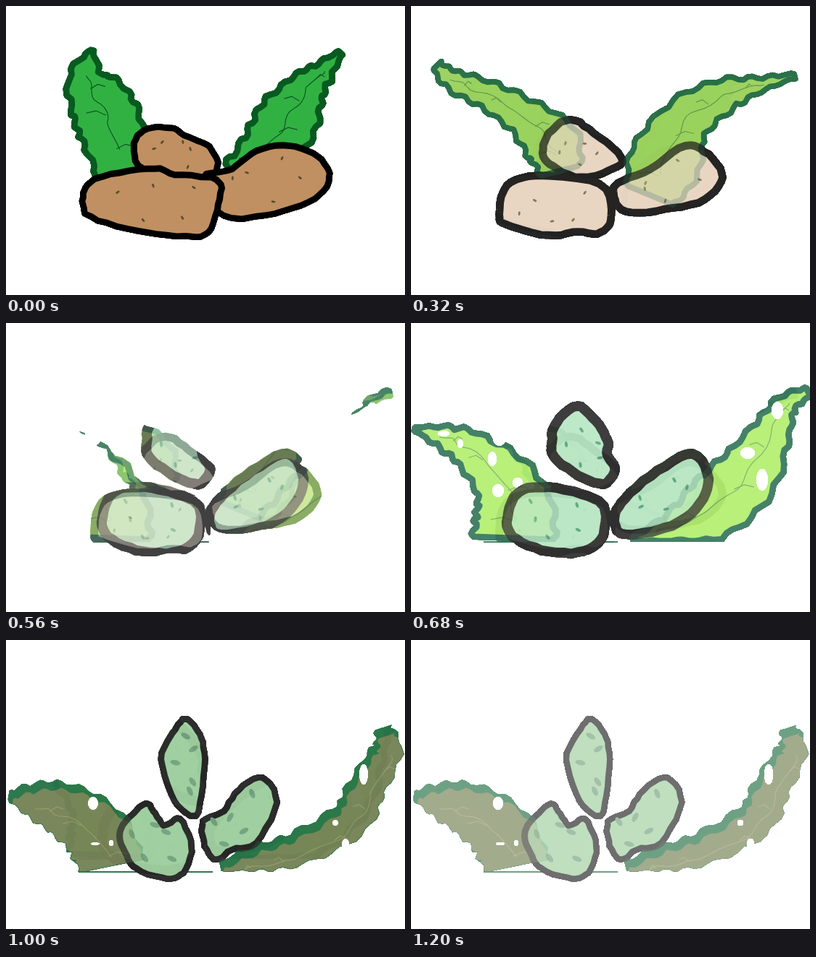
These frames come from a looping animation (550 by 400 pixels, 1.24 s). An HTML page with a canvas:

```html
<!DOCTYPE html>
<html lang="en">
<head>
<meta charset="utf-8">
<title>Potatoes and leaves</title>
<style>
html, body { margin: 0; width: 100%; height: 100%; overflow: hidden; background: #fff; }
canvas { display: block; width: 550px; height: 400px; }
</style>
</head>
<body>
<canvas id="stage" width="550" height="400"></canvas>
<script>
const W = 550, H = 400, STEP = 40, STEPS = 31, CUT = 140;

let seed = 7;
const rnd = () => (seed = seed * 16807 % 2147483647) / 2147483647;
const jitter = r => (rnd() - 0.5) * 2 * r;

function layer() {
  const g = Object.assign(document.createElement('canvas'), { width: W, height: H })
    .getContext('2d', { willReadFrequently: true });
  g.lineJoin = g.lineCap = 'round';
  return g;
}

const points = s => s.split(' ').map(p => p.split(',').map(Number));

// Catmull-Rom samples through points of any dimension.
function spline(p, closed, sub) {
  const n = p.length, out = [];
  const at = i => p[closed ? (i + n) % n : Math.max(0, Math.min(n - 1, i))];
  for (let i = 0; i < (closed ? n : n - 1); i++) {
    const a = at(i - 1), b = at(i), c = at(i + 1), d = at(i + 2);
    for (let j = 0; j < sub; j++) {
      const t = j / sub;
      out.push(b.map((v, k) => v + t / 2 * (c[k] - a[k] +
        t * (2 * a[k] - 5 * v + 4 * c[k] - d[k] + t * (3 * v - a[k] - 3 * c[k] + d[k])))));
    }
  }
  if (!closed) out.push(p[n - 1]);
  return out;
}

function shape(p, closed) {
  const path = new Path2D();
  p.forEach(([x, y]) => path.lineTo(x, y));
  if (closed) path.closePath();
  return path;
}

function paint(g, path, fill, ink, width) {
  g.fillStyle = fill;
  g.fill(path);
  g.strokeStyle = ink;
  g.lineWidth = width;
  g.stroke(path);
}

// A leaf is a spine of "x,y,half width" with scalloped sides.
function drawLeaf(g, keys, o) {
  const mid = spline(points(keys), false, 8), left = [], right = [];
  mid.forEach(([x, y, w], i) => {
    const a = mid[Math.max(0, i - 1)], b = mid[Math.min(mid.length - 1, i + 1)];
    const dx = b[0] - a[0], dy = b[1] - a[1], len = Math.hypot(dx, dy) || 1;
    const side = (list, dir, phase) => {
      const r = dir * (w + Math.min(3, w / 5) * Math.sin(i * 1.5 + phase) + jitter(1));
      list.push([x - dy / len * r, Math.min(o.floor, y + dx / len * r)]);
    };
    side(left, 1, 0);
    side(right, -1, 2);
  });
  const path = shape(left.concat(right.reverse()), true);
  paint(g, path, o.green, o.edge, o.rim);

  g.save();
  g.clip(path);
  if (o.core) {
    g.translate(5, 11);
    g.fillStyle = o.core;
    g.fill(path);
  }
  const vein = mid.slice(7, -5);
  g.strokeStyle = o.vein;
  g.lineWidth = 1.2;
  g.stroke(shape(vein.map(([x, y], i) => [x + 4 * Math.sin(i * 0.7), y + 2 * Math.cos(i)])));
  for (let i = 4; i < vein.length; i += 8) {
    const [x, y, w] = vein[i], dir = i % 16 < 8 ? 1 : -1;
    g.stroke(shape([[x, y], [x + dir * w * 0.3, y - 6], [x + dir * w * 0.6, y - 3]]));
  }
  g.restore();
}

function drawPotato(g, keys, o) {
  const p = points(keys);
  const edge = spline(p, true, 5).map(([x, y]) => [x + jitter(0.9), y + jitter(0.9)]);
  paint(g, shape(edge, true), o.skin, '#000', o.ink);
  const [cx, cy] = [0, 1].map(k => p.reduce((sum, q) => sum + q[k], 0) / p.length);
  g.fillStyle = o.spot;
  for (let i = 0; i < 5; i++) {
    const q = p[Math.floor(i * p.length / 5)], r = 0.4 + rnd() * 0.28;
    g.beginPath();
    g.ellipse(cx + (q[0] - cx) * r, cy + (q[1] - cy) * r, o.size, o.size / 2, jitter(1.5), 0, 7);
    g.fill();
  }
}

function pose(o) {
  const leaf = layer(), g = layer();
  if (o.floor < H) {
    leaf.rect(0, 0, W, o.floor + 1);
    leaf.clip();
  }
  o.leaves.forEach(keys => drawLeaf(leaf, keys, o));
  leaf.globalCompositeOperation = 'destination-out';
  for (const [x, y, rx, ry] of o.holes ? points(o.holes) : []) {
    leaf.beginPath();
    leaf.ellipse(x, y, rx, ry, 0, 0, 7);
    leaf.fill();
  }
  g.drawImage(leaf.canvas, 0, 0);
  if (o.floor < H) {
    g.fillStyle = o.edge;
    g.fillRect(100, o.floor, 185, 2);
  }
  o.potatoes.forEach(keys => drawPotato(g, keys, o));
  // The leaves shine through the potatoes a little.
  g.globalCompositeOperation = 'source-atop';
  g.globalAlpha = o.shine;
  g.drawImage(leaf.canvas, 0, 0);
  return g.canvas;
}

const fresh = {
  green: '#32b143', edge: '#075a20', rim: 9, vein: '#0b5a20', floor: H,
  skin: '#c09062', ink: 9, spot: '#55502c', size: 3, shine: 0,
  leaves: ['118,61,2 111,100,26 131,138,42 147,175,43 160,232,34',
    '461,65,3 436,92,15 413,117,27 388,158,42 355,200,34 312,232,16'],
  potatoes: ['176,195 190,172 225,168 250,181 280,195 292,222 265,242 190,226',
    '273,238 312,226 345,200 390,193 430,208 446,237 425,267 370,287 300,291',
    '112,247 145,233 205,225 232,233 291,241 293,275 279,313 247,319 182,312 118,293 106,276']
};

const pale = {
  green: '#8dcc45', edge: '#07592a', rim: 8, vein: '#4a8a30', floor: H,
  skin: '#e6d2bb', ink: 11, spot: '#75623f', size: 3, shine: 0.27,
  leaves: ['36,82,6 58,103,14 105,123,19 155,153,26 194,191,38 206,228,27',
    '529,97,3 480,109,10 430,125,23 378,160,34 350,215,49 330,262,35'],
  potatoes: ['182,204 190,176 220,157 252,176 290,208 280,225 235,238 195,222',
    '280,264 285,245 330,225 378,193 410,206 430,237 405,268 350,282 296,285',
    '122,289 132,248 175,235 260,246 277,290 262,314 230,313 190,318 130,302']
};

const mouldy = {
  green: '#a2ec50', edge: '#0a5a38', rim: 9, vein: '#5f9a45', floor: 302,
  skin: '#a9e3b9', ink: 14, spot: '#369468', size: 4, shine: 0.22,
  holes: '45,153,8,4 68,167,4,6 112,188,6,10 120,232,8,9 147,221,7,7 122,160,9,10 464,180,10,8 484,217,8,15 505,121,8,12',
  leaves: ['5,147,2 45,158,16 82,176,26 125,216,41 142,258,53 142,298,56',
    '548,96,6 518,112,14 497,150,26 464,210,42 412,258,42 360,283,20 306,300,3'],
  potatoes: ['194,165 200,137 229,115 255,136 271,162 271,183 282,202 265,223 230,211 197,185',
    '280,270 295,242 340,205 388,181 410,215 398,250 360,280 295,293',
    '133,270 148,234 190,227 245,240 268,260 262,300 230,318 180,314 140,295']
};

const rotten = {
  green: '#005a26', core: '#5d6b38', edge: '#005a26', rim: 2, vein: '#7e8748', floor: 320,
  skin: '#8fc78f', ink: 9, spot: '#5b9368', size: 7, shine: 0.3,
  holes: '123,282,6,2 145,281,3,4 120,226,7,9 468,282,5,7 454,253,4,4 493,186,6,14',
  leaves: ['4,215,6 40,222,26 82,236,38 125,268,45 148,320,45',
    '519,122,11 525,152,20 497,205,26 472,250,27 400,289,23 345,302,17 296,314,7'],
  potatoes: ['247,109 267,130 274,165 268,225 258,244 232,222 214,165 230,128',
    '272,251 300,236 320,207 353,190 373,225 345,281 311,290 290,304 274,285',
    '157,264 190,227 203,236 218,256 240,248 256,285 245,322 222,330 180,317 164,294']
};

const poses = [fresh, pale, mouldy, rotten].map(pose);
const ramp = (f, a, b) => Math.max(0, Math.min(1, (f - a) / (b - a)));

function weights(f) {
  const b = ramp(f, 0, 9.4), c = ramp(f, 9.4, 19.4), d = ramp(f, 20.45, 26);
  return [1 - b, b - c, c - d, d - ramp(f, 26, 35.3)];
}

const view = document.getElementById('stage').getContext('2d');
const mix = layer();
let shown = -1;

function draw(f) {
  mix.clearRect(0, 0, W, H);
  weights(f).forEach((w, i) => {
    mix.globalAlpha = w;
    mix.drawImage(poses[i], 0, 0);
  });
  // Anything too faint drops out completely.
  const img = mix.getImageData(0, 0, W, H), px = img.data;
  for (let i = 3; i < px.length; i += 4) if (px[i] < CUT) px[i] = 0;
  view.putImageData(img, 0, 0);
}

function tick() {
  const f = Math.floor(performance.now() / STEP) % STEPS;
  if (f !== shown) draw(shown = f);
  requestAnimationFrame(tick);
}
tick();
</script>
</body>
</html>
```
